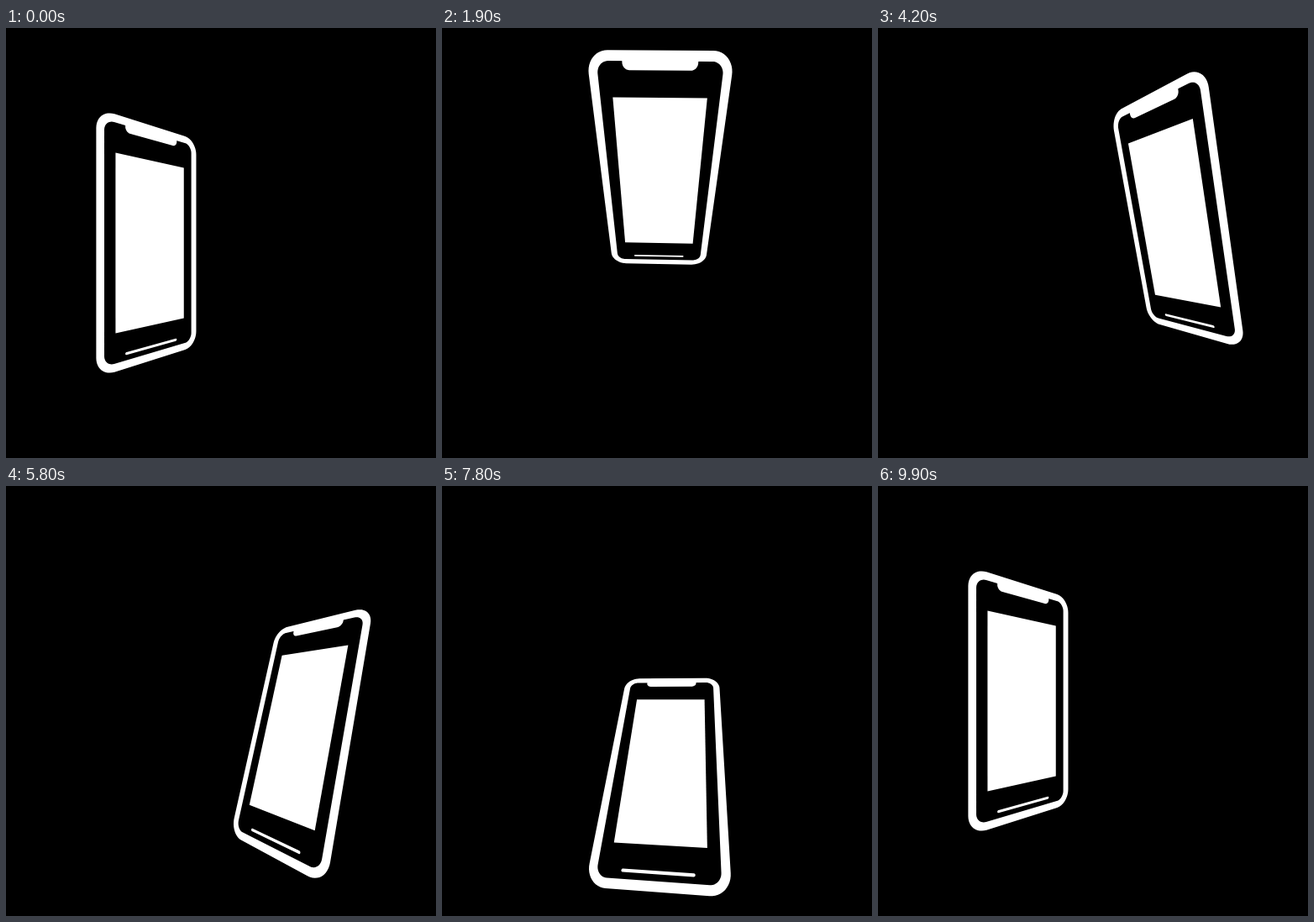
An HTML page with a canvas for the animation above (10000 ms loop, 512 px wide and 512 px high).

```html
<!DOCTYPE html>
<html lang="en">
<head>
<meta charset="utf-8">
<title>Orbiting phone</title>
<style>
  html, body { margin: 0; height: 100%; overflow: hidden; background: #000; }
  canvas { display: block; width: 100vmin; height: 100vmin; }
</style>
</head>
<body>
<canvas id="stage" width="512" height="512"></canvas>
<script>
const ctx = document.getElementById('stage').getContext('2d');
const { sin, cos, PI } = Math;
const VIEW = 380;    // camera distance to the pivot
const RADIUS = 140.4; // pivot distance to the phone
const DEG = PI / 180;

// Points of a rounded rectangle, centred on x = 0
function roundRect(halfWidth, top, bottom, r) {
  const corners = [[1, bottom - r], [-1, bottom - r], [-1, top + r], [1, top + r]];
  const points = [];
  corners.forEach(([side, cy], q) => {
    const cx = side * (halfWidth - r);
    const steps = r ? 12 : 0;
    for (let i = 0; i <= steps; i++) {
      const a = (q + (steps ? i / steps : 0)) * PI / 2;
      points.push([cx + r * cos(a), cy + r * sin(a)]);
    }
  });
  return points;
}

const frame = [roundRect(87, -174.7, 174.7, 25.5), roundRect(76, -163.5, 163.5, 14)];
const solids = [
  roundRect(60, -122.5, 122.5, 0),
  roundRect(45.3, -173.5, -153.7, 8),
  roundRect(45.3, 152.2, 156, 1.9)
];

function draw(step) {
  const t = 2 * PI * step / 99;
  const phase = t + 0.268 * sin(t) + 0.02 * sin(2 * t) + 0.0105 * (1 - cos(t));
  const rise = sin(phase);
  const sway = (rise + rise * rise) / 2; // slight extra tilt near the top
  const yaw = (6 - 52.5 * cos(phase)) * DEG;
  const pitch = (40.3 * rise + sway) * DEG;
  const roll = sway * DEG;

  const project = ([x, y]) => {
    const py = y * cos(pitch) - RADIUS * sin(pitch);
    const pz = y * sin(pitch) + RADIUS * cos(pitch);
    const scale = VIEW / (VIEW + pz * cos(yaw) - x * sin(yaw));
    const sx = scale * (x * cos(yaw) + pz * sin(yaw));
    const sy = scale * py;
    return [256 + sx * cos(roll) - sy * sin(roll), 256 + sx * sin(roll) + sy * cos(roll)];
  };

  const fill = shapes => {
    ctx.beginPath();
    for (const shape of shapes) {
      shape.forEach((p, i) => ctx[i ? 'lineTo' : 'moveTo'](...project(p)));
      ctx.closePath();
    }
    ctx.fill('evenodd');
  };

  ctx.fillStyle = '#000';
  ctx.fillRect(0, 0, 512, 512);
  ctx.fillStyle = '#fff';
  fill(frame);
  solids.forEach(shape => fill([shape]));
}

const start = performance.now();
function tick() {
  draw(Math.floor((performance.now() - start) / 100) % 100);
  requestAnimationFrame(tick);
}
tick();
</script>
</body>
</html>
```
